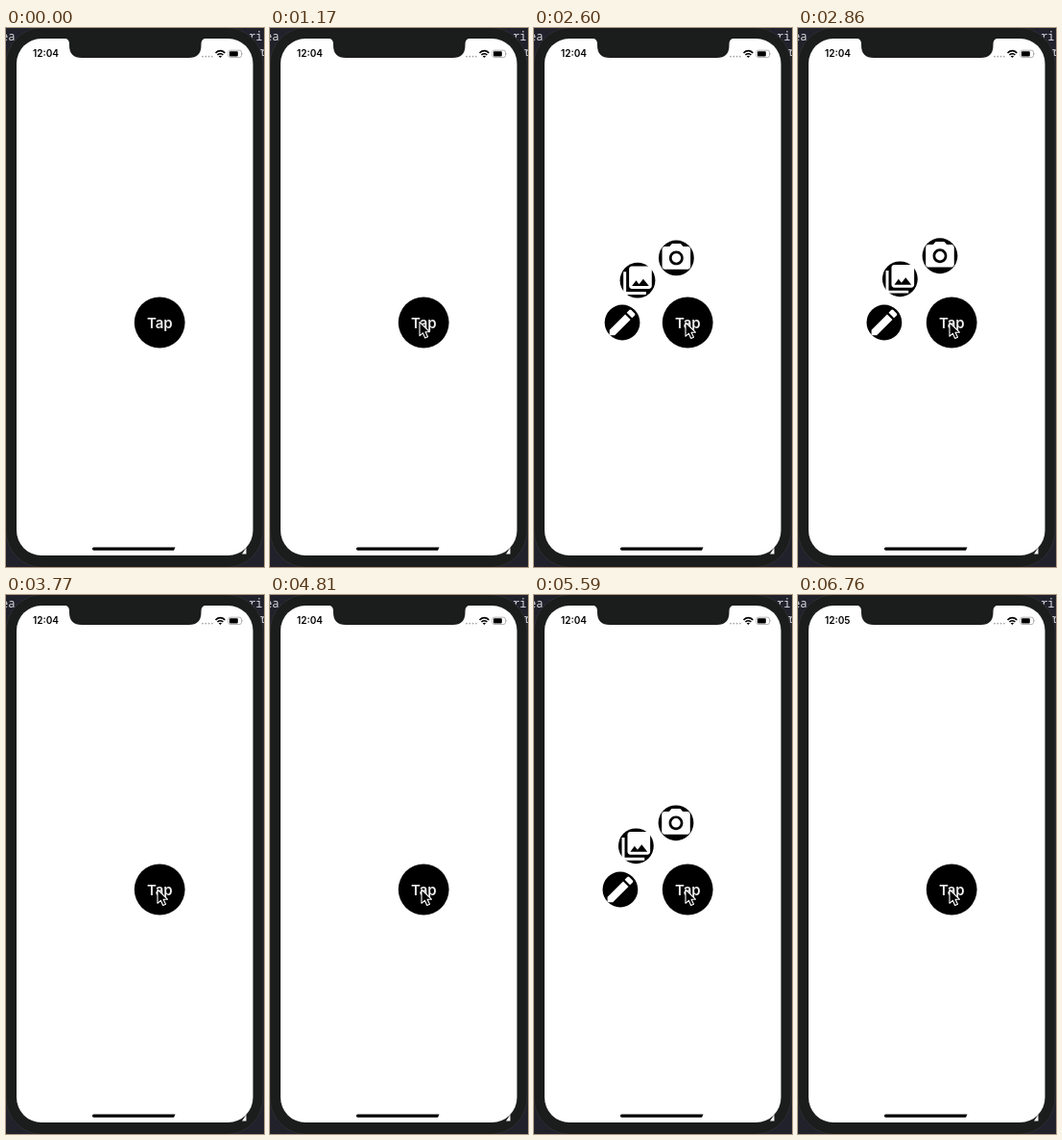
Animation, 269 px wide and 560 px high, one loop 7670 ms. Source, as an HTML page:

```html
<!DOCTYPE html>
<html lang="en">
<head>
<meta charset="utf-8">
<title>Radial menu</title>
<style>
  html, body { margin: 0; width: 100%; height: 100%; overflow: hidden; background: #20212b; }
  svg { display: block; width: 100vw; height: 100vh; }
  .ui { font-family: Inter, Roboto, sans-serif; font-weight: 600; }
  .code { font-family: "Noto Sans Mono", "DejaVu Sans Mono", monospace; font-size: 12px; fill: #d6d7dc; }
  .icon { fill: #fff; }
</style>
</head>
<body>
<svg viewBox="0 0 269 560">
  <rect width="269" height="560" fill="#20212b"/>
  <g class="code">
    <text x="-5" y="13">ea</text>
    <text x="253" y="13">ri</text>
    <text x="264" y="29">r</text>
  </g>

  <rect x="0" y="-.5" width="268" height="561" rx="38" fill="#1b1c1c" stroke="#303134" stroke-width=".8"/>
  <rect x="11" y="11" width="246.5" height="537" rx="26" fill="#fff"/>
  <path fill="#1b1c1c" d="M61 10.5Q66 11.5 66 16.5V18Q66 31 79 31H190.500Q203.500 31 203.500 18V16.500Q203.500 11.500 208.500 10.500Z"/>
  <path fill="#fff" d="M246 546.500L250.500 540V546.500Z"/>

  <text id="clock" class="ui" x="28" y="30.300" font-size="10">12:04</text>
  <g fill="#a5a5a5">
    <circle cx="205" cy="29.600" r=".9"/><circle cx="208.300" cy="29.600" r=".9"/>
    <circle cx="211.600" cy="29.600" r=".9"/><circle cx="214.900" cy="29.600" r=".9"/>
  </g>
  <g fill="none" stroke="#000" stroke-width="1.600">
    <path d="M218.500 25.800Q223.400 21.600 228.300 25.800"/>
    <path d="M220.400 28Q223.400 25.500 226.400 28"/>
  </g>
  <path d="M221.700 29.300Q223.400 28.200 225.100 29.300L223.400 31Z"/>
  <rect x="231.900" y="23.200" width="13.600" height="7.300" rx="2" fill="none" stroke="#a0a0a0" stroke-width=".8"/>
  <rect x="233" y="24.300" width="8.800" height="5.100" rx="1"/>
  <path d="M246.500 25.500Q248 26.800 246.500 28.200Z" fill="#a0a0a0"/>
  <path d="M91.500 539.500H176.500L175 542.700H91.500A1.600 1.600 0 0 1 91.500 539.500Z"/>

  <g id="menu"></g>
  <circle cx="160.200" cy="306" r="26.400"/>
  <text class="ui" x="160.300" y="311.600" font-size="15" text-anchor="middle" fill="#ededed">Tap</text>
  <path id="cursor" d="M0 0V14.300L3.300 11.300L5.700 16.600L8.500 15.300L6.100 10.200H10.400Z" stroke="#fff" stroke-width="1.100" stroke-linejoin="round"/>
</svg>
<script>
const LOOP = 7670, STEP = 130;
const HUB = { x: 160.2, y: 306 }, REACH = 70;
const OPENINGS = [[2128, 3770], [4898, 6370]];
const ICONS = {
  camera: "M12 8.800A3.200 3.200 0 1 1 12 15.200A3.200 3.200 0 1 1 12 8.800ZM9 2L7.170 4H4c-1.100 0-2 .9-2 2v12c0 1.100.9 2 2 2h16c1.100 0 2-.9 2-2V6c0-1.100-.9-2-2-2h-3.170L15 2H9zm3 15c-2.760 0-5-2.240-5-5s2.240-5 5-5 5 2.240 5 5-2.240 5-5 5z",
  photos: "M22 16V4c0-1.100-.9-2-2-2H8c-1.100 0-2 .9-2 2v12c0 1.100.9 2 2 2h12c1.100 0 2-.9 2-2zm-11-4l2.030 2.710L16 11l4 5H8l3-4zM2 6v14c0 1.100.9 2 2 2h14v-2H4V6H2z",
  pencil: "M3 17.250V21h3.750L17.810 9.940l-3.750-3.750L3 17.250zM20.710 7.040a1 1 0 0 0 0-1.410l-2.340-2.340a1 1 0 0 0-1.410 0l-1.830 1.830 3.750 3.750 1.830-1.830z"
};

const byId = id => document.getElementById(id);
const menu = byId("menu"), cursor = byId("cursor"), clock = byId("clock");

menu.innerHTML = Object.values(ICONS).map(d =>
  `<g><circle r="18.400"/><path class="icon" fill-rule="evenodd" transform="scale(1.48) translate(-12 -12)" d="${d}"/></g>`
).join("");
const items = [...menu.children].map((el, i) => ({ el, angle: (80 - 40 * i) * Math.PI / 180 }));

const place = (el, x, y) => el.setAttribute("transform", `translate(${x.toFixed(2)} ${y.toFixed(2)})`);

// Underdamped spring from 0 to 1, damping ratio 0.5
function spring(s) {
  const decay = 7.585, freq = 13.14;
  return 1 - Math.exp(-decay * s) * (Math.cos(freq * s) + decay / freq * Math.sin(freq * s));
}

function cursorAt(t) {
  if (t < 390) return [300, 500];
  if (t < 1170) {
    const left = Math.pow(1 - (t - 390) / 650, 1.6);
    return [161 + 101 * left, 301 + 151 * left];
  }
  if (t < 1430) return [156, 305.5];
  return t < 1560 ? [157, 305.5] : [158, 306];
}

function draw(t) {
  const open = OPENINGS.find(([from, to]) => t >= from && t < to);
  const dist = open ? REACH * spring((t - open[0]) / 1000) : 0;
  menu.style.display = open ? "" : "none";
  for (const { el, angle } of items)
    place(el, HUB.x - dist * Math.cos(angle), HUB.y - dist * Math.sin(angle));
  place(cursor, ...cursorAt(t));
  clock.textContent = t < 6760 ? "12:04" : "12:05";
}

const start = performance.now();
function tick() {
  const t = (performance.now() - start) % LOOP;
  draw(Math.floor(t / STEP) * STEP);
  requestAnimationFrame(tick);
}
tick();
</script>
</body>
</html>
```
